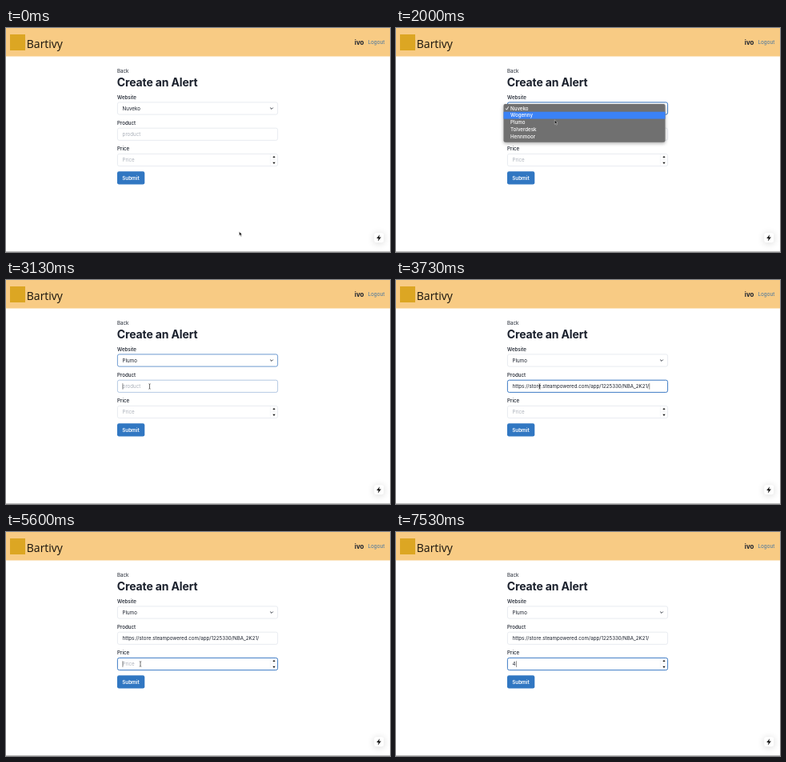
An HTML page with a canvas that plays this animation: 480 by 280 pixels, repeating every 8000 ms.

```html
<!DOCTYPE html>
<html lang="en">
<head>
<meta charset="utf-8">
<title>Create an Alert</title>
<style>
html, body { margin: 0; width: 100%; height: 100%; overflow: hidden; background: #fff; }
canvas { display: block; width: 480px; height: 280px; }
</style>
</head>
<body>
<canvas id="stage"></canvas>
<script>
const LOOP = 8000;
const SANS = 'Inter, "Liberation Sans", sans-serif';
const INK = '#1a202c', HINT = '#a9afb8', LINE = '#e2e6ec', BLUE = '#427fc8';
const LEFT = 139, WIDTH = 201, FIELD_H = 16;
const SITE_Y = 92.5, PRODUCT_Y = 124.8, PRICE_Y = 157;
const SITES = ['Nuveko', 'Wogenny', 'Plumo', 'Tolverdesk', 'Hennmoor'];
const LINK = 'https://store.steampowered.com/app/1225330/NBA_2K21/';

// Moments of the interaction, in ms
const PRESS = 1000, OPEN = 1330, ROW1 = 1900, ROW2 = 2060, FADE = 2410, CHOSEN = 2600;
const PRODUCT = 3070, LIST = 3270, PASTE = 3670, PRICE = 5470, TYPE = 7470;

// Pointer stops: time, x, y
const PATH = [
  [130, 291.5, 254.5], [930, 200, 100], [1800, 200, 100], [2000, 198.3, 115],
  [2400, 198, 120], [2670, 198, 120], [3070, 179.5, 133], [4600, 179.5, 133],
  [5270, 168, 165], [5670, 168, 165], [6270, 300, 165.5], [6400, 300, 165.5], [6600, 326, 164.5]
];

const ratio = window.devicePixelRatio || 1;

function surface(canvas) {
  canvas.width = 480 * ratio;
  canvas.height = 280 * ratio;
  const context = canvas.getContext('2d');
  context.scale(ratio, ratio);
  return context;
}

const screen = surface(document.getElementById('stage'));
const layer = surface(document.createElement('canvas'));
let ctx = screen;

const clamp = v => Math.max(0, Math.min(1, v));
const ramp = (t, start, span) => clamp((t - start) / span);
const smooth = p => p * p * (3 - 2 * p);

function text(str, x, y, { size = 6.2, weight = 400, color = INK, family = SANS, gap = 0 } = {}) {
  ctx.font = `${weight} ${size}px ${family}`;
  ctx.letterSpacing = gap + 'px';
  ctx.fillStyle = color;
  ctx.fillText(str, x, y);
}

function box(x, y, w, h, r, fill, stroke, line = 0.8) {
  ctx.beginPath();
  ctx.roundRect(x, y, w, h, r);
  if (fill) { ctx.fillStyle = fill; ctx.fill(); }
  if (stroke) { ctx.strokeStyle = stroke; ctx.lineWidth = line; ctx.stroke(); }
}

function shape(points, fill) {
  ctx.beginPath();
  points.forEach(([x, y]) => ctx.lineTo(x, y));
  ctx.closePath();
  ctx.fillStyle = fill;
  ctx.fill();
}

function polyline(points, color, width) {
  ctx.beginPath();
  points.forEach(([x, y]) => ctx.lineTo(x, y));
  ctx.strokeStyle = color;
  ctx.lineWidth = width;
  ctx.stroke();
}

function shadowBox(x, y, w, h, r, fill, color, blur, dy) {
  ctx.save();
  ctx.shadowColor = color;
  ctx.shadowBlur = blur * ratio;
  ctx.shadowOffsetY = dy * ratio;
  box(x, y, w, h, r, fill);
  ctx.restore();
}

function header() {
  ctx.fillStyle = '#f8cb84';
  ctx.fillRect(0, 0, 480, 35.5);
  ctx.fillStyle = '#dca623';
  ctx.fillRect(5, 8, 19, 20);
  text('Bartivy', 25.8, 25.3, { size: 14, family: '"Open Sans", "Noto Sans", sans-serif', color: '#17130c' });
  text('ivo', 435.8, 20.6, { size: 7.9, weight: 700 });
  text('Logout', 452.4, 20.2, { size: 6.35, color: '#45749f' });
}

function field(y, focus) {
  box(LEFT + 0.4, y + 0.4, WIDTH - 0.8, FIELD_H - 0.8, 2.2, '#fff', LINE);
  if (focus <= 0) return;
  ctx.globalAlpha = focus;
  box(LEFT + 0.4, y + 0.4, WIDTH - 0.8, FIELD_H - 0.8, 2.2, null, BLUE, 1);
  ctx.globalAlpha = 1;
}

function caret(x, y, since, t) {
  if (Math.floor((t - since) / 500) % 2) return;
  ctx.fillStyle = '#222';
  ctx.fillRect(x, y + 4.3, 0.5, 7.6);
}

function form(t) {
  text('Back', LEFT, 56.2);
  text('Create an Alert', LEFT - 0.2, 73, { size: 14, weight: 700, gap: -0.14 });
  const label = { weight: 500 };
  text('Website', LEFT, 88.8, label);
  text('Product', LEFT, 121.1, label);
  text('Price', LEFT, 153.3, label);

  field(SITE_Y, ramp(t, PRESS, 130) - ramp(t, PRODUCT, 200));
  text(t < CHOSEN ? SITES[0] : SITES[2], 145.6, 102.7);
  polyline([[330.2, 99.6], [332, 101.4], [333.8, 99.6]], INK, 0.9);

  field(PRODUCT_Y, ramp(t, PRODUCT, 200) - ramp(t, PRICE, 130));
  const pasted = t >= PASTE;
  text(pasted ? LINK : 'product', 145.6, 135.1, { color: pasted ? INK : HINT });
  if (t >= PRODUCT && t < PRICE) {
    caret(pasted ? 146 + ctx.measureText(LINK).width : 145.7, PRODUCT_Y, pasted ? PASTE : 3100, t);
  }

  field(PRICE_Y, ramp(t, PRICE, 130));
  polyline([[330.3, 158], [330.3, 172]], '#eef0f3', 0.6);
  polyline([[330.3, 165], [339, 165]], '#eef0f3', 0.6);
  shape([[333.3, 162.1], [335, 160], [336.7, 162.1]], '#111');
  shape([[333.3, 167.8], [335, 169.9], [336.7, 167.8]], '#111');
  const typed = t >= TYPE;
  text(typed ? '4' : 'Price', 145.6, 167.3, { color: typed ? INK : HINT });
  if (t >= PRICE) caret(typed ? 150 : 145.7, PRICE_Y, typed ? TYPE : PRICE, t);

  box(LEFT, 179.3, 34.3, 16.2, 2.2, '#3177c2');
  text('Submit', 145.2, 189.7, { size: 6.3, weight: 600, color: '#fff' });
}

// Painted opaque on its own layer, so that it fades as one piece
function menu(t) {
  if (t < OPEN || t >= CHOSEN) return;
  ctx = layer;
  ctx.clearRect(0, 0, 480, 280);
  shadowBox(134.5, 95, 202, 47.8, 2, '#707070', 'rgba(0,0,0,.35)', 4, 1.5);
  const active = t < ROW1 ? 0 : t < ROW2 ? 1 : 2;
  ctx.fillStyle = '#3b82f6';
  ctx.fillRect(134.5, 95.8 + active * 8.9, 202, 8.9);
  SITES.forEach((name, i) => text(name, 143, 102.5 + i * 8.9, { weight: 500, color: '#fff' }));
  polyline([[137.2, 100.6], [138.4, 102.2], [140.6, 98.4]], '#fff', 0.9);
  ctx = screen;
  ctx.globalAlpha = 1 - ramp(t, FADE, CHOSEN - FADE) ** 2;
  ctx.drawImage(layer.canvas, 0, 0, 480, 280);
  ctx.globalAlpha = 1;
}

// Suggestion panel under the product field
function suggestions(t) {
  if (t < LIST || t >= PASTE) return;
  shadowBox(LEFT, 141, WIDTH, 78.5, 1, '#fff', 'rgba(0,0,0,.2)', 2, 0.5);
}

function bolt() {
  shadowBox(460.2, 256.2, 12, 12, 2.4, '#fff', 'rgba(0,0,0,.16)', 9, 1);
  shape([[467.1, 258.3], [463.2, 263.1], [465.7, 263.1], [464.9, 266.6], [468.9, 261.6], [466.3, 261.6]], '#111');
}

function pointerAt(t) {
  const next = PATH.findIndex(stop => stop[0] > t);
  if (next < 1) return (next ? PATH[PATH.length - 1] : PATH[0]).slice(1);
  const [t0, x0, y0] = PATH[next - 1], [t1, x1, y1] = PATH[next];
  const p = smooth((t - t0) / (t1 - t0));
  return [x0 + (x1 - x0) * p, y0 + (y1 - y0) * p];
}

function pointer(t) {
  if (t >= TYPE) return;
  const [x, y] = pointerAt(t);
  const inside = top => y > top && y < top + FIELD_H;
  ctx.save();
  ctx.translate(x, y);
  if (inside(PRODUCT_Y) || inside(PRICE_Y)) {
    polyline([[0, -3], [0, 3]], '#222', 0.65);
    polyline([[-1.3, -3.3], [0, -2.8], [1.3, -3.3]], '#222', 0.5);
    polyline([[-1.3, 3.3], [0, 2.8], [1.3, 3.3]], '#222', 0.5);
  } else {
    shape([[0, 0], [0, 5.2], [1.2, 4.1], [2.1, 6.1], [3, 5.7], [2.1, 3.8], [3.7, 3.7]], '#0a0a0a');
    ctx.strokeStyle = 'rgba(255,255,255,.85)';
    ctx.lineWidth = 0.5;
    ctx.stroke();
  }
  ctx.restore();
}

function draw(now) {
  const t = now % LOOP;
  ctx.fillStyle = '#fff';
  ctx.fillRect(0, 0, 480, 280);
  header();
  form(t);
  suggestions(t);
  menu(t);
  bolt();
  ctx.fillStyle = '#b8b8b8';
  ctx.fillRect(0, 279, 480, 1);
  pointer(t);
}

let start;
function tick(now) {
  start ??= now;
  draw(now - start);
  requestAnimationFrame(tick);
}
requestAnimationFrame(tick);
</script>
</body>
</html>
```
